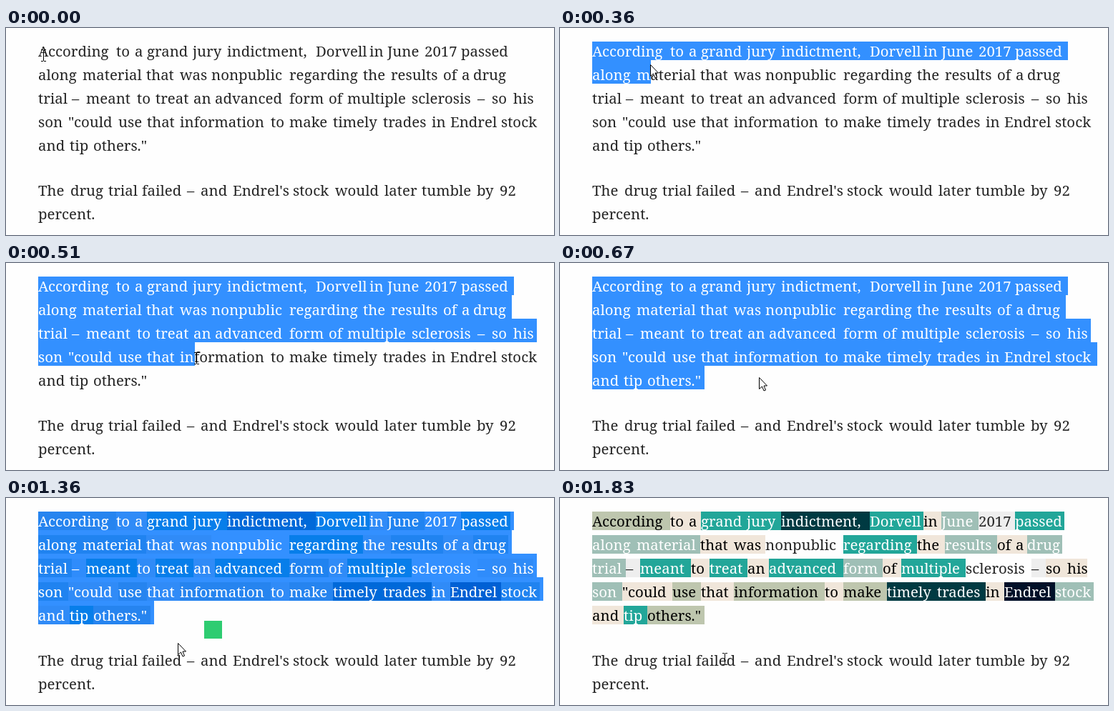
Recreate the animation shown at these times as an HTML page with a canvas. Size 766 px wide and 290 px high, loop 2530 ms.

```html
<!DOCTYPE html>
<html lang="en">
<head>
<meta charset="utf-8">
<title>Selecting text to highlight words</title>
<style>
  html, body { margin: 0; width: 100%; height: 100%; overflow: hidden; background: #fefefe; }
  canvas { display: block; }
</style>
</head>
<body>
<canvas id="stage" width="766" height="290"></canvas>
<script>
const ctx = document.getElementById('stage').getContext('2d');
const LOOP = 2530;
const LEFT = 45, TOP = 19, PITCH = 33, BOX = 26, SPACE = 5;
const PAPER = '#fefefe', INK = '#242424';
const SELECTION = 'rgba(0, 117, 255, 0.8)';

// Highlight styles: [background, text colour]
const STYLES = {
  o: ['#bec6ae', '#000'],
  b: ['#f0e6da', '#000'],
  t: ['#22a699', '#fff'],
  l: ['#9fbfb6', '#fff'],
  n: ['#003a42', '#fff'],
  k: ['#001028', '#fff'],
  g: ['#eeeeee', INK]
};

const line = (baseline, text, starts, end, styles = '') =>
  ({ baseline, words: text.split(' '), starts, end, styles });

const lines = [
  line(40, 'According to a grand jury indictment, Dorvell in June 2017 passed',
    [45, 154, 180, 197, 261, 309, 433, 508, 533, 585, 636], 705, 'obbttntblgt'),
  line(73, 'along material that was nonpublic regarding the results of a drug',
    [45, 107, 196, 243, 287, 396, 499, 538, 611, 637, 653], 702, 'llbb.tblbbl'),
  line(106, 'trial – meant to treat an advanced form of multiple sclerosis – so his',
    [45, 92, 112, 183, 209, 262, 292, 396, 451, 477, 567, 659, 679, 709], 737, 'lgtbtbtlbt.gbb'),
  line(139, 'son "could use that information to make timely trades in Endrel stock',
    [45, 87, 157, 197, 243, 370, 396, 457, 527, 595, 621, 692], 746, 'lbobobonnbkl'),
  line(172, 'and tip others."', [45, 89, 122], 202, 'bto'),
  line(235, 'The drug trial failed – and Endrel\'s stock would later tumble by 92',
    [45, 90, 143, 190, 253, 272, 317, 401, 460, 529, 581, 658, 690], 714),
  line(268, 'percent.', [45], 130)
];

// sel: [last selected line, right edge on that line]
const states = [
  { at: 0, beam: [52, 38] },
  { at: 280, beam: [78, 41], sel: [0, 78] },
  { at: 360, arrow: [126, 51], sel: [1, 127] },
  { at: 440, beam: [202, 98], sel: [2, 202] },
  { at: 510, beam: [266, 133], sel: [3, 264] },
  { at: 590, arrow: [275, 152], sel: [4, 202] },
  { at: 670, arrow: [278, 160], sel: [4, 202] },
  { at: 1050, arrow: [278, 160], sel: [4, 207], marked: true, button: true },
  { at: 1280, arrow: [262, 178], sel: [4, 207], marked: true, button: true },
  { at: 1360, arrow: [240, 203], sel: [4, 207], marked: true, button: true },
  { at: 1440, beam: [230, 222], sel: [4, 207], marked: true, button: true },
  { at: 1760, beam: [230, 225], sel: [4, 207], marked: true, button: true },
  { at: 1830, beam: [230, 225], marked: true }
];

function drawMarks() {
  lines.forEach(({ starts, end, styles }, row) => {
    starts.forEach((x, i) => {
      const style = STYLES[styles[i]];
      if (!style) return;
      ctx.fillStyle = style[0];
      ctx.fillRect(x, TOP + row * PITCH, (starts[i + 1] ?? end) - x, BOX);
    });
  });
}

function drawText(colourOf) {
  lines.forEach(({ baseline, words, starts, styles }) => {
    words.forEach((word, i) => {
      ctx.fillStyle = colourOf(styles[i]);
      ctx.fillText(word, starts[i], baseline);
    });
  });
}

function drawSelection([last, edge]) {
  ctx.save();
  ctx.beginPath();
  for (let row = 0; row <= last; row++) {
    const bottom = TOP + BOX + row * PITCH;
    const top = row ? bottom - PITCH : TOP;
    const right = row < last ? lines[row].end + SPACE : edge;
    ctx.rect(LEFT, top, right - LEFT, bottom - top);
  }
  ctx.clip();
  ctx.fillStyle = PAPER;
  ctx.fillRect(0, 0, 766, 290);
  return () => ctx.restore();
}

function drawArrow([x, y]) {
  const points = [[0, 0], [0, 16], [4, 12.5], [6.5, 18.5], [9, 17.5], [6.5, 11.5], [11, 11.5]];
  ctx.beginPath();
  points.forEach(([dx, dy]) => ctx.lineTo(x + dx + 0.5, y + dy + 0.5));
  ctx.closePath();
  ctx.fillStyle = '#fff';
  ctx.fill();
  ctx.strokeStyle = '#000';
  ctx.lineWidth = 1;
  ctx.stroke();
}

function drawBeam([x, y]) {
  ctx.fillStyle = '#000';
  ctx.fillRect(x, y - 7, 1, 15);
  for (const edge of [y - 8, y + 8]) {
    ctx.fillRect(x - 3, edge, 3, 1);
    ctx.fillRect(x + 1, edge, 3, 1);
  }
}

function draw({ beam, arrow, sel, marked, button }) {
  ctx.fillStyle = PAPER;
  ctx.fillRect(0, 0, 766, 290);
  if (marked) drawMarks();
  drawText(style => marked && STYLES[style] ? STYLES[style][1] : INK);

  if (sel) {
    const release = drawSelection(sel);
    if (marked) drawMarks();
    ctx.fillStyle = SELECTION;
    ctx.fillRect(0, 0, 766, 290);
    drawText(() => '#fff');
    release();
  }
  if (button) {
    ctx.fillStyle = '#2ecc71';
    ctx.fillRect(277, 172, 25, 25);
  }
  if (arrow) drawArrow(arrow);
  if (beam) drawBeam(beam);
}

ctx.font = '20.4px "Noto Serif", serif';
ctx.textBaseline = 'alphabetic';

function tick() {
  const time = performance.now() % LOOP;
  draw(states.findLast(state => state.at <= time));
  requestAnimationFrame(tick);
}
tick();
</script>
</body>
</html>
```
